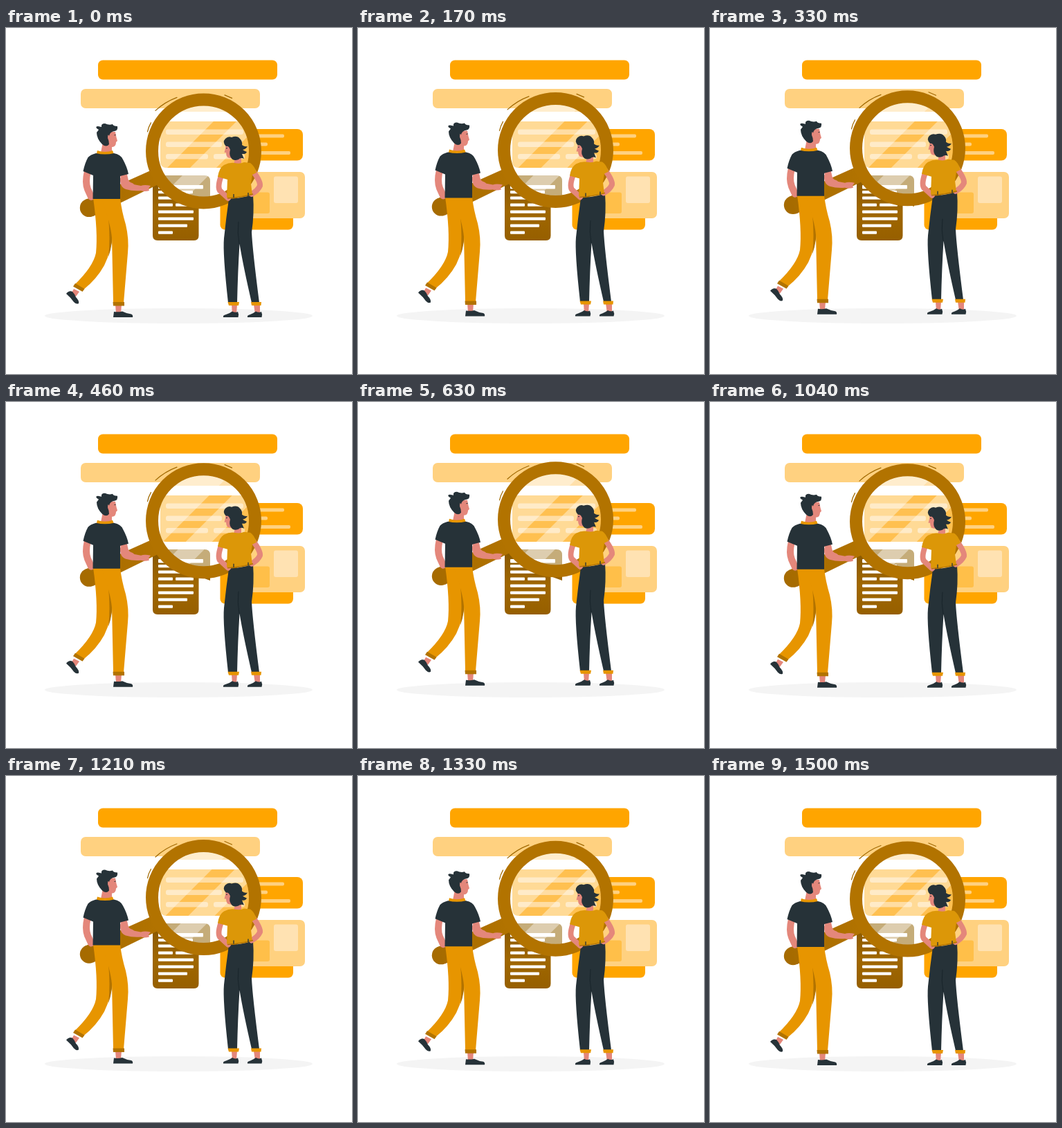
Write an HTML page that moves like this. It is 500 px wide and 500 px high and loops after 1540 ms.

```html
<!DOCTYPE html>
<html lang="en">
<head>
<meta charset="utf-8">
<title>Search</title>
<style>
  html, body { margin: 0; width: 100%; height: 100%; overflow: hidden; background: #fff; }
  svg { display: block; width: 100vw; height: 100vh; }
  .orange { fill: #ffa500; }
  .pale { fill: #ffd180; }
  .dark { fill: #263238; }
  .skin { fill: #e4877b; }
  .gold { fill: #e79500; }
  .shade { fill: #b27300; }
  .arm { fill: none; stroke: #e4877b; stroke-linecap: round; stroke-linejoin: round; }
  .thin { fill: none; stroke: #a06800; stroke-width: 1.2; stroke-linecap: round; }
</style>
</head>
<body>
<svg viewBox="0 0 500 500">
  <defs>
    <linearGradient id="brown" x1="0" y1="0" x2="0" y2="1">
      <stop offset="0" stop-color="#875700"/>
      <stop offset=".55" stop-color="#a06700"/>
      <stop offset="1" stop-color="#965f00"/>
    </linearGradient>
    <linearGradient id="grip" x1="0" y1="0" x2="1" y2="0">
      <stop offset="0" stop-color="#a66b00"/>
      <stop offset="1" stop-color="#b27300"/>
    </linearGradient>
    <clipPath id="lens"><circle id="hole" cx="285.5" cy="178" r="66"/></clipPath>
    <clipPath id="glass"><circle cx="285.5" cy="178" r="66"/></clipPath>
    <path id="note" d="M219 213H287Q295 213 295 221V258L278.500 252V300Q278.500 307 272 307H219Q212 307 212 300V220Q212 213 219 213Z"/>
    <g id="lines" fill="#fff"></g>
  </defs>

  <rect width="500" height="500" fill="#fff"/>
  <ellipse cx="249.5" cy="416" rx="193.5" ry="11" fill="#f4f4f4"/>
  <rect class="orange" x="133" y="46.5" width="259" height="28" rx="7"/>
  <rect class="pale" x="108" y="88" width="259" height="28" rx="7"/>

  <rect class="orange" x="330" y="146" width="99" height="45.5" rx="8"/>
  <g fill="#ffd180">
    <rect x="340" y="153.5" width="62" height="5" rx="2"/>
    <rect x="340" y="165.5" width="38" height="5" rx="2"/>
    <rect x="340" y="178" width="71" height="5" rx="2"/>
  </g>
  <rect class="orange" x="309.5" y="226" width="105.5" height="65.5" rx="7"/>
  <rect class="pale" x="326" y="208" width="106" height="67" rx="7"/>
  <rect x="340" y="237.5" width="41" height="30.5" rx="3" fill="#ffbf49"/>
  <rect x="387" y="214.5" width="35" height="38.5" rx="3" fill="#ffe2b2"/>

  <use href="#note" fill="url(#brown)"/>
  <use href="#lines"/>

  <g clip-path="url(#lens)">
    <rect x="200" y="80" width="170" height="180" fill="#fff"/>
    <rect x="200" y="80" width="170" height="41" fill="#ffe0ab"/>
    <rect x="223" y="135" width="150" height="67" rx="8" fill="#ffc050"/>
    <g fill="#ffdda3">
      <rect x="231" y="146.5" width="112" height="7.5" rx="3"/>
      <rect x="231" y="164.5" width="81" height="7.5" rx="3"/>
      <rect x="231" y="182" width="61" height="7.5" rx="3"/>
      <rect x="300" y="182" width="45" height="7.5" rx="3"/>
    </g>
    <use href="#note" fill="#c5ac79"/>
    <use href="#lines"/>
  </g>

  <g id="scene">
    <g clip-path="url(#glass)" fill="#fff" fill-opacity=".4">
      <path d="M200 100H335L200 235Z"/>
      <path d="M208 260L368 100H406L246 260Z"/>
    </g>

    <circle cx="120" cy="260" r="13.2" fill="#a66b00"/>
    <path d="M114 248.500L210 205.500L220 226L126 272Z" fill="url(#grip)"/>
    <circle cx="285.5" cy="178" r="74.5" fill="none" stroke="#b27300" stroke-width="18"/>
    <path class="thin" d="M204.500 150Q206 143 209.500 137M216 119.500A92 92 0 0 1 247 100.500M316 97L326.500 101.500"/>

    <g id="man">
      <path class="arm" stroke-width="10" d="M118 207Q114 223 118 233L123 244"/>
      <path class="skin" d="M98 377L106 381L101 388L94 384Z M158 400H167L166 412H159Z"/>
      <path class="dark" d="M87 384Q91 379 96 381Q99 384 101 389Q106 394 105 398Q102 400 98 396Q94 390 87 384Z"/>
      <path class="dark" d="M156 410Q162 411 168 409.500Q175 413 181 413.500Q184 415 183 418H155Z"/>
      <path class="gold" d="M126 246H160Q157 275 154 297Q153 320 142 343Q131 363 112 378L99 371Q126 345 130 325Q133 295 126 246Z"/>
      <path class="shade" d="M148 274L154 290Q154.500 312 148 331Q151 305 148 274Z"/>
      <path class="gold" d="M138 246H165Q167 264 173 284Q178 305 176 325L170 397H155L153 303Q151 282 138 246Z"/>
      <path class="shade" d="M100 369L113.500 377L110.500 381L97 373.500Z M154.500 396H171V401.500H155Z"/>

      <path class="skin" d="M140 165H153V178Q149 183 137 180Z"/>
      <path class="skin" d="M146 150H158L159.500 158L161 163L159 165Q159 171 154 172Q146 172 143 165Z"/>
      <path class="dark" d="M131 145Q129 142 133 142L138 143Q137 138 143 138Q149 141 154 139Q155 142 161 142Q162 148 157 149Q150 150 149 156Q147 152 147 159Q149 163 149 168Q145 173 139 168Q131 160 131 151L134 147Z"/>
      <path d="M156.500 155L158.500 154.500" stroke="#263238" fill="none"/>
      <path class="gold" d="M132 177Q143 181 154 177L157 185H130Z"/>
      <path class="arm" stroke-width="10" d="M169 208L172 221Q174 227 181 229"/>
      <path class="skin" d="M168 219L179 225L195 228Q200 226 209 228L206 232L207 235Q201 237 195 235Q183 236 173 233Q164 230 165 216Z"/>
      <path class="dark" d="M130 181Q143 184 156 181Q166 183 169 190Q175 201 177 211L165 214V247H125.500L126 213L111.500 207Q114 195 118.500 187Q122 183 130 181Z"/>
    </g>

    <g id="woman">
      <path class="skin" d="M326 400H334L333 413H327Z M358 400H367L367 413H360Z"/>
      <path class="dark" d="M335 410Q337 414 335.500 418H314Q313 415 318 414Q324 412 327 409.500Q331 412 335 410Z"/>
      <path class="dark" d="M369 410Q371 414 369.500 418H349Q348 415 353 414Q358 412 361 409.500Q365 412 369 410Z"/>
      <path class="dark" d="M322 247Q340 246 357 241Q359 268 355 295Q356 319 366 397H355Q343 345 337.500 312Q335 352 334 397H321Q313 325 315 304Q318 275 322 247Z"/>
      <path d="M337 312Q334 296 336 280" fill="none" stroke="#18242a" stroke-width="1"/>
      <path class="gold" d="M320.500 396H337L336 401H322Z M354 396H369L368.500 401H355Z"/>

      <path class="arm" stroke-width="8" d="M312 211Q305 229 309 235L321 246"/>
      <path class="arm" stroke-width="8" d="M357 207Q368 222 367 228Q364 235 355 240"/>
      <path class="skin" d="M333 183H340V195Q335 199 329 196Z"/>
      <path class="skin" d="M318 166L317 174L315.500 180H318Q318 188 324 188L334 190L337 170Z"/>
      <path d="M318 174L320 173.500" stroke="#263238" fill="none"/>
      <path class="dark" d="M318 171Q312 165 317 160Q321 156 326 158Q334 155 338 160Q342 164 341 169Q345 172 349 171Q347 175 342 176Q345 178 348 179Q346 183 341 182L344 189Q339 187 336 190Q328 193 325 187Q322 183 324 176Q322 170 318 171Z"/>
      <path fill="#dc9708" d="M315 198Q323 194 330 195Q338 197 344 194L353 195Q359 199 362 209L356 212L354 225L356 241Q338 245 319 245L320 219L306 215Q308 202 315 198Z"/>
      <path d="M320 246Q340 245 357 240" fill="none" stroke="#b27300" stroke-width="1.5"/>
      <path d="M329 240V245M350 238V243" fill="none" stroke="#263238" stroke-width="1.3"/>
    </g>
  </g>
</svg>
<script>
  const LOOP = 1540, LEAD = 50, RISE = 4.25;
  const get = id => document.getElementById(id);
  const scene = get('scene'), hole = get('hole');

  // x, y, width, height of each text bar on the note
  const bars = [
    [220, 227, 65, 5.5], [220, 235, 50, 4.2], [220, 243.5, 51, 4.2],
    [220, 253.5, 21, 4.2], [245, 253.5, 26, 4.2], [220, 263.5, 51, 4.2],
    [220, 273.5, 51, 4.2], [220, 283.5, 42, 4.2], [220, 293.5, 21, 4.2]
  ];
  get('lines').innerHTML = bars.map(([x, y, w, h]) =>
    `<rect x="${x}" y="${y}" width="${w}" height="${h}" rx="1"/>`).join('');

  function draw(ms) {
    const turn = 2 * Math.PI * (ms + LEAD) / LOOP;
    const y = -RISE * (1 - Math.cos(turn));
    scene.setAttribute('transform', `translate(0 ${y.toFixed(3)})`);
    hole.setAttribute('cy', 178 + y);
  }

  const start = performance.now();
  function tick() {
    draw((performance.now() - start) % LOOP);
    requestAnimationFrame(tick);
  }
  draw(0);
  requestAnimationFrame(tick);
</script>
</body>
</html>
```
